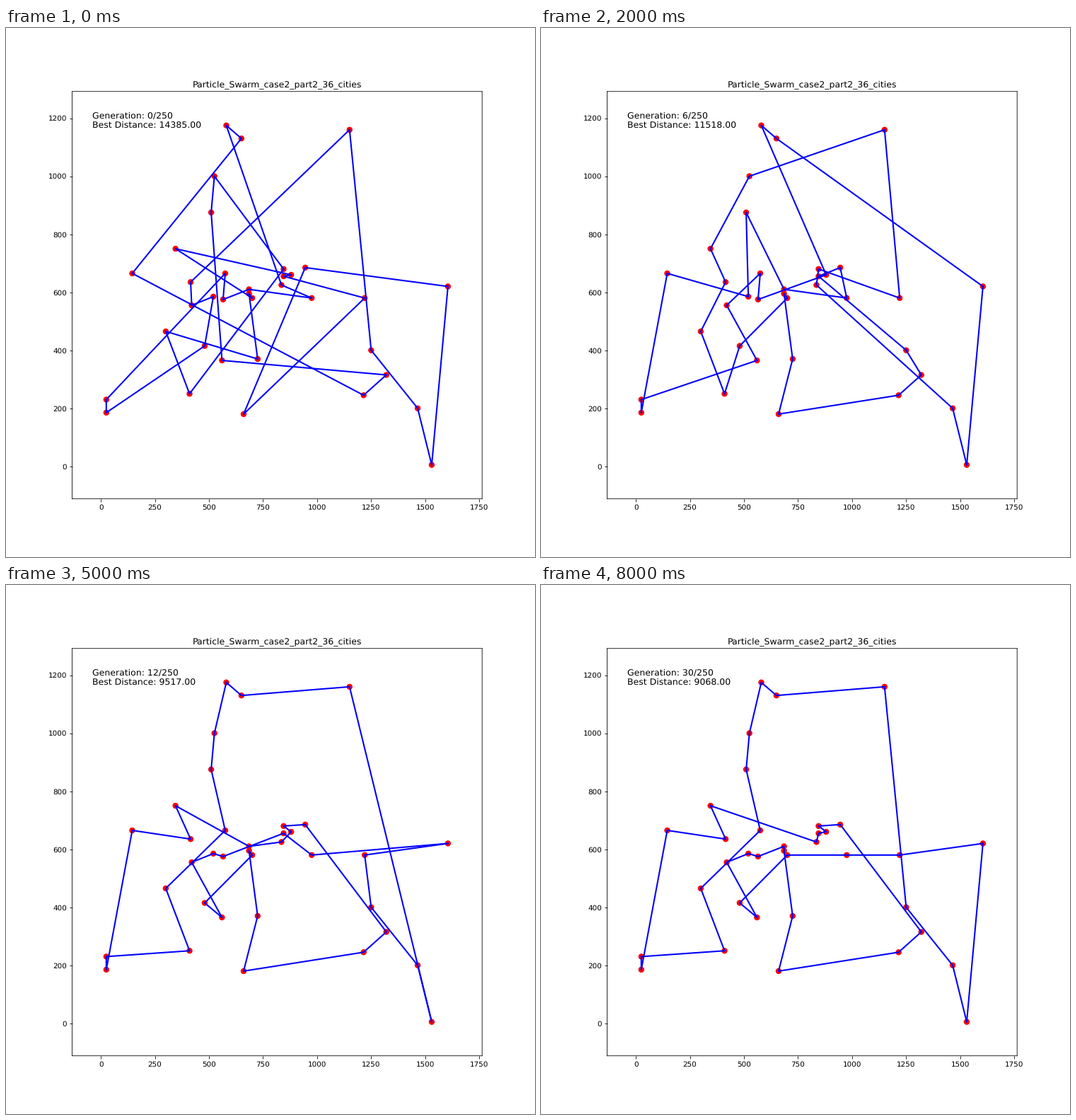
Animation of 748x748 px, one loop 8500 ms. Source, as a matplotlib script:

```python
import numpy as np
import matplotlib.pyplot as plt
from matplotlib.animation import FuncAnimation
from matplotlib.collections import LineCollection

SIZE = 748
STEP_MS = 500
MAX_GENERATION = 250

# Listed in visiting order of the initial route.
CITIES = np.array([
    (580, 1175), (650, 1130), (145, 665), (1215, 245), (1320, 315), (560, 365),
    (510, 875), (525, 1000), (845, 680), (410, 250), (300, 465), (725, 370),
    (685, 595), (700, 580), (345, 750), (880, 660), (845, 655), (1220, 580),
    (660, 180), (945, 685), (1605, 620), (1530, 5), (1465, 200), (1250, 400),
    (1150, 1160), (415, 635), (420, 555), (520, 585), (480, 415), (25, 185),
    (25, 230), (575, 665), (565, 575), (685, 610), (975, 580), (835, 625),
])

GENERATIONS = [0, 1, 3, 4, *range(6, 18), 30]

FIRST_BEST = [0, 1, 20, 21, 22, 28, 8, 17, 24, 7, 14, 25, 10, 9, 26, 35, 6, 11,
              18, 3, 4, 23, 34, 19, 16, 33, 2, 5, 32, 27, 30, 29, 13, 31, 12, 15]

# Swaps that lead to each later best route; in every group the first city
# trades places with each of the others in turn.
SWAPS = [
    [(13, 28)],
    [(35, 13), (28, 26), (16, 34), (6, 12, 32, 2), (29, 27), (21, 22)],
    [(21, 22), (5, 27)],
    [(16, 34), (19, 35, 34), (32, 6)],
    [(19, 34)],
    [(21, 22), (15, 7)],
    [(21, 22), (32, 14), (25, 27), (5, 9)],
    [(20, 24, 34, 8, 17), (19, 23), (16, 15), (10, 26, 25)],
    [(35, 15), (25, 10)],
    [(20, 17)],
    [(16, 35)],
    [(21, 23)],
    [(35, 33)],
    [(13, 33)],
    [(32, 28), (27, 5)],
]


def improve(route, groups):
    route = list(route)
    for first, *others in groups:
        for other in others:
            i, j = route.index(first), route.index(other)
            route[i], route[j] = other, first
    return route


def legs(route):
    """Line segments of the closed route, shaped (leg, end, xy)."""
    points = CITIES[route]
    return np.stack([points, np.roll(points, -1, axis=0)], axis=1)


def length(segments):
    return int(np.hypot(*(segments[:, 1] - segments[:, 0]).T).sum())


routes = [list(range(len(CITIES))), FIRST_BEST]
for groups in SWAPS:
    routes.append(improve(routes[-1], groups))

plt.rcParams.update({
    "font.family": "DejaVu Sans",
    "text.hinting": "none",
    "path.snap": False,
})
fig, ax = plt.subplots(figsize=(10, 10), dpi=SIZE / 10)
ax.set_title("Particle_Swarm_case2_part2_36_cities", fontsize=12)
# One size per dot keeps the dots at sub-pixel positions.
ax.scatter(*CITIES.T, c="red", s=np.full(len(CITIES), 50))
tour = LineCollection([], colors="blue", linewidths=2, capstyle="round", zorder=2)
ax.add_collection(tour, autolim=False)
label = ax.text(0.05, 0.95, "", transform=ax.transAxes, fontsize=12, va="top")

low, high = CITIES.min(axis=0), CITIES.max(axis=0)
margin = 0.1 * (high - low)
ax.set_xlim(low[0] - margin[0], high[0] + margin[0])
ax.set_ylim(low[1] - margin[1], high[1] + margin[1])


def draw(i):
    segments = legs(routes[i])
    tour.set_segments(segments)
    label.set_text(f"Generation: {GENERATIONS[i]}/{MAX_GENERATION}\n"
                   f"Best Distance: {length(segments):.2f}")
    return tour, label


anim = FuncAnimation(fig, draw, frames=len(routes), interval=STEP_MS,
                     repeat=True, repeat_delay=0)
plt.show()
```
